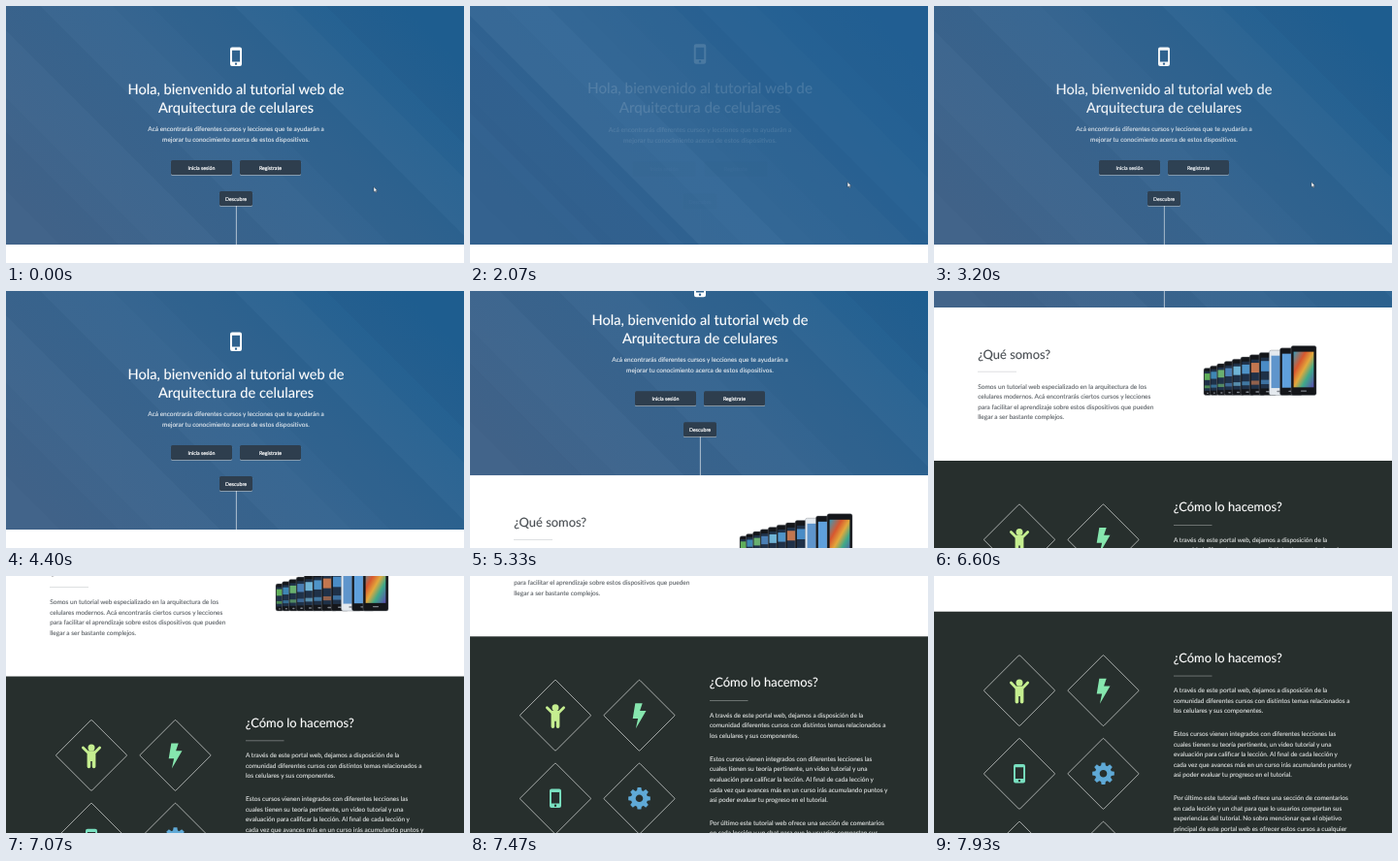
Write an HTML page that moves like this. It is 472 px wide and 265 px high and loops after 8000 ms.

```html
<!DOCTYPE html>
<html lang="es">
<head>
<meta charset="utf-8">
<title>Arquitectura de celulares</title>
<style>
  html, body { margin: 0; width: 100%; height: 100%; overflow: hidden; background: #fff; }
  svg { display: block; width: 472px; height: 265px; }
  text { font-family: Lato, "Open Sans", sans-serif; text-rendering: geometricPrecision; white-space: pre; }
</style>
</head>
<body>
<svg id="stage" viewBox="0 0 472 265">
  <defs>
    <linearGradient id="sky" x1="0" y1="0.75" x2="1" y2="0.25">
      <stop offset="0" stop-color="#42648a"/>
      <stop offset="0.5" stop-color="#366590"/>
      <stop offset="1" stop-color="#1f6092"/>
    </linearGradient>
    <linearGradient id="wall" x1="0" y1="0" x2="1" y2="1">
      <stop offset="0" stop-color="#3a9ab8"/>
      <stop offset="0.3" stop-color="#d8572f"/>
      <stop offset="0.5" stop-color="#e3a83c"/>
      <stop offset="0.7" stop-color="#3fa98a"/>
      <stop offset="1" stop-color="#5a4bb0"/>
    </linearGradient>
    <clipPath id="head"><rect width="472" height="246"/></clipPath>
    <path id="mobile" fill-rule="evenodd" d="M-4-9.8h8a2 2 0 0 1 2 2v15.6a2 2 0 0 1-2 2h-8a2 2 0 0 1-2-2v-15.6a2 2 0 0 1 2-2zM-4.1-6.4v11.6h8.2v-11.6zM0 6.2a1.2 1.2 0 0 0 0 2.4a1.2 1.2 0 0 0 0-2.4z"/>
  </defs>
  <g id="page">
    <g clip-path="url(#head)">
      <rect width="472" height="246" fill="url(#sky)"/>
      <g id="stripes"></g>
      <g id="haze"></g>
    </g>
    <g id="hero" fill="#fff"></g>
    <g id="about"></g>
    <g id="how"></g>
  </g>
  <path id="cursor" d="M0 0v5.2l1.2-1 .8 1.8.9-.4-.8-1.7h1.6z" fill="#fff" stroke="#1c2a38" stroke-width=".4"/>
</svg>
<script>
const $ = id => document.getElementById(id);

function add(parent, tag, attrs, label) {
  const el = document.createElementNS('http://www.w3.org/2000/svg', tag);
  for (const key in attrs) el.setAttribute(key, attrs[key]);
  if (label) el.textContent = label;
  parent.append(el);
  return el;
}

// A hairline stroke gives the text its slightly heavy look
function lines(parent, list, x, y, size, step, attrs) {
  list.forEach((line, i) => add(parent, 'text', {
    x, y: y + i * step, 'font-size': size, stroke: attrs.fill, 'stroke-width': .12, ...attrs
  }, line));
}

// Diagonal bands: left edge at the top, width, fill
function band(parent, x, w, fill) {
  add(parent, 'path', { d: `M${x} 0h${w}l246 246h${-w}z`, fill });
}

const dark = a => `rgba(18,44,84,${a})`, light = a => `rgba(150,190,215,${a})`;
[[-190, 60, dark(.03)], [-95, 70, light(.02)], [-25, 60, dark(.03)], [35, 75, light(.02)],
 [150, 85, dark(.03)], [235, 60, light(.03)], [330, 150, dark(.04)]]
  .forEach(b => band($('stripes'), ...b));
add($('haze'), 'rect', { width: 472, height: 246, fill: '#256194', opacity: .45 });
[[-110, 70, dark(.04)], [-10, 90, light(.08)], [80, 130, light(.03)]]
  .forEach(b => band($('haze'), ...b));

// Hero
const hero = $('hero'), mid = { 'text-anchor': 'middle', fill: '#fff' };
const intro = add(hero, 'g', {}), actions = add(hero, 'g', {});
add(intro, 'use', { href: '#mobile', x: 237, y: 52.2 });
lines(intro, ['Hola, bienvenido al tutorial web de', 'Arquitectura de celulares'],
  237, 90.7, 14.65, 19.5, mid);
lines(intro, ['Acá encontrarás diferentes cursos y lecciones que te ayudarán a',
  'mejorar tu conocimiento acerca de estos dispositivos.'],
  237, 129.3, 6.5, 10.6, { ...mid, opacity: .85 });

function button(x, y, w, label) {
  add(actions, 'rect', { x, y: y + .7, width: w, height: 15, rx: 1.5, fill: '#a3b0bb' });
  add(actions, 'rect', { x, y, width: w, height: 15, rx: 1.5, fill: '#2e3e4e' });
  lines(actions, [label], x + w / 2, y + 9.5, 5.25, 0, { ...mid, 'stroke-width': .2 });
}
button(170, 159, 63, 'Inicia sesión');
button(241, 159, 63, 'Registrate');
button(220, 191, 34, 'Descubre');
add(actions, 'rect', { x: 236.9, y: 206, width: .8, height: 40, opacity: .75 });

// About
const about = $('about');
lines(about, ['¿Qué somos?'], 45.3, 298.8, 12.9, 0, { fill: '#484d52' });
add(about, 'rect', { x: 45, y: 311.8, width: 40, height: .7, fill: '#cfd2d4' });
lines(about, ['Somos un tutorial web especializado en la arquitectura de los',
  'celulares modernos. Acá encontrarás ciertos cursos y lecciones',
  'para facilitar el aprendizaje sobre estos dispositivos que pueden',
  'llegar a ser bastante complejos.'], 45.3, 329.5, 6.53, 10.6, { fill: '#62676c' });

const screens = ['#5fae5a', '#3f86b4', '#69b06f', '#4a7fb5', '#6fb4d6', '#4f94c8',
  '#c2764f', '#4a8cc6', '#5f95cc', '#5fa0dc', 'url(#wall)'];
screens.forEach((fill, i) => {
  const p = i / 10, x = 278 + 62 * p + 28 * p * p, h = 28 + 23 * p, w = 8 + 6 * p + 12 * p * p;
  const y = 336.5 - h, white = i === 8, whole = i > 7;
  const left = x + w * .1, top = y + h * .12, wide = w * .8;
  add(about, 'rect', { x, y, width: w, height: h, rx: 2, fill: white ? '#e4e9ee' : '#14161a',
    stroke: '#7b8087', 'stroke-width': .4 });
  add(about, 'rect', { x: left, y: top, width: wide, height: h * .72, fill: whole ? fill : '#1f3148' });
  if (!whole) {
    add(about, 'rect', { x: left, y: top + h * .08, width: wide, height: h * .24, fill });
    add(about, 'rect', { x: left, y: top + h * .52, width: wide, height: h * .1, fill, opacity: .7 });
  }
  add(about, 'rect', { x: x + w * .38, y: y + h * .9, width: w * .24, height: 1.4, rx: .7, fill: '#7d828a' });
});

// How
const how = $('how');
add(how, 'rect', { y: 404, width: 472, height: 300, fill: '#272f2d' });
for (const y of [485.4, 571.2, 657]) for (const x of [88, 174.5])
  add(how, 'rect', { x: -26, y: -26, width: 52, height: 52, rx: 1, fill: 'none', stroke: '#d5d8d7',
    'stroke-width': .7, transform: `translate(${x} ${y}) rotate(45)` });

const child = add(how, 'g', { transform: 'translate(88 486)', fill: '#c5ee90' });
add(child, 'circle', { cy: -8.6, r: 3.5 });
add(child, 'path', { d: 'M-8.6-8.6L-3.8-3.8H3.8L8.6-8.6', fill: 'none', stroke: '#c5ee90',
  'stroke-width': 2.8, 'stroke-linecap': 'round', 'stroke-linejoin': 'round' });
add(child, 'path', { d: 'M-4.4-4.6h8.8v15.6a1.7 1.7 0 0 1-3.6 0v-5.6h-1.6v5.6a1.7 1.7 0 0 1-3.6 0z' });
add(how, 'path', { transform: 'translate(174.5 486)', fill: '#86e6ae',
  d: 'M-4.2-13h7.4l-2.6 7.8h6.4L-3.6 13l2.2-10.2h-5.4z' });
add(how, 'use', { href: '#mobile', x: 88, y: 571, fill: '#79e0c0' });
const cog = add(how, 'g', { transform: 'translate(174.5 571)', fill: '#5fa9d6' });
for (let a = 0; a < 360; a += 45)
  add(cog, 'path', { d: 'M-2.6-7l.7-4.3h3.8l.7 4.3z', transform: `rotate(${a})` });
add(cog, 'circle', { r: 6.2, fill: 'none', stroke: '#5fa9d6', 'stroke-width': 4.8 });

lines(how, ['¿Cómo lo hacemos?'], 246.8, 456, 12.95, 0, { fill: '#fff' });
add(how, 'rect', { x: 247, y: 470, width: 39.5, height: .7, fill: '#8b908f' });
const copy = [
  ['A través de este portal web, dejamos a disposición de la',
   'comunidad diferentes cursos con distintos temas relacionados a',
   'los celulares y sus componentes.'],
  ['Estos cursos vienen integrados con diferentes lecciones las',
   'cuales tienen su teoría pertinente, un video tutorial y una',
   'evaluación para calificar la lección. Al final de cada lección y',
   'cada vez que avances más en un curso irás acumulando puntos y',
   'asi poder evaluar tu progreso en el tutorial.'],
  ['Por último este tutorial web ofrece una sección de comentarios',
   'en cada lección y un chat para que lo usuarios compartan sus',
   'experiencias del tutorial. No sobra mencionar que el objetivo',
   'principal de este portal web es ofrecer estos cursos a cualquier']
];
[487.6, 532.6, 598.4].forEach((y, i) =>
  lines(how, copy[i], 247, y, 6.53, 10.55, { fill: '#d9dcdb' }));

// Motion
const LOOP = 8000, STEP = 1000 / 15, RELOAD = 930;
const clamp = x => Math.min(1, Math.max(0, x));

// cubic-bezier(.25, .1, .25, 1)
function ease(x) {
  x = clamp(x);
  let lo = 0, hi = 1, u = x;
  const curve = (a, b) => 3 * (1 - u) * (1 - u) * u * a + 3 * (1 - u) * u * u * b + u * u * u;
  for (let i = 0; i < 20; i++) {
    u = (lo + hi) / 2;
    if (curve(.25, .25) < x) lo = u; else hi = u;
  }
  return curve(.1, 1);
}

// Piecewise-linear track of [time, value] pairs
function track(keys, t) {
  const i = keys.findIndex(k => k[0] > t);
  if (i === 0) return keys[0][1];
  if (i < 0) return keys[keys.length - 1][1];
  const [t0, a] = keys[i - 1], [t1, b] = keys[i];
  return a + (b - a) * (t - t0) / (t1 - t0);
}

const scroll = [[4800, 0], [4930, 4], [5070, 20], [5330, 55.4], [6130, 157], [7070, 301], [7400, 338], [7930, 367.3]];
const cursorX = [[1730, 379], [1930, 393], [2070, 389], [3500, 389], [4200, 453], [4330, 474]];
const cursorY = [[1730, 186.5], [2070, 181.5], [3500, 181.5], [4200, 224], [4330, 236]];
const haze = [[RELOAD - 70, 0], [1070, 1], [2070, 1], [2470, 0]];

function draw(t) {
  $('page').setAttribute('transform', `translate(0 ${-track(scroll, t)})`);
  const loaded = t < RELOAD - 5;
  const scale = loaded ? 1 : 1.05 - .05 * ease((t - 1830) / 1500);
  hero.setAttribute('transform', `translate(237 120) scale(${scale}) translate(-237 -120)`);
  intro.setAttribute('opacity', loaded ? 1 : ease((t - 1820) / 2000));
  actions.setAttribute('opacity', loaded ? 1 : ease((t - 2030) / 1800));
  $('haze').setAttribute('opacity', track(haze, t));
  $('cursor').setAttribute('transform', `translate(${track(cursorX, t)} ${track(cursorY, t)})`);
  $('cursor').setAttribute('visibility', t < 4260 ? 'visible' : 'hidden');
}

function tick() {
  const t = performance.now() % LOOP;
  draw(Math.floor((t + 4) / STEP) % 120 * STEP);
  requestAnimationFrame(tick);
}
tick();
</script>
</body>
</html>
```
